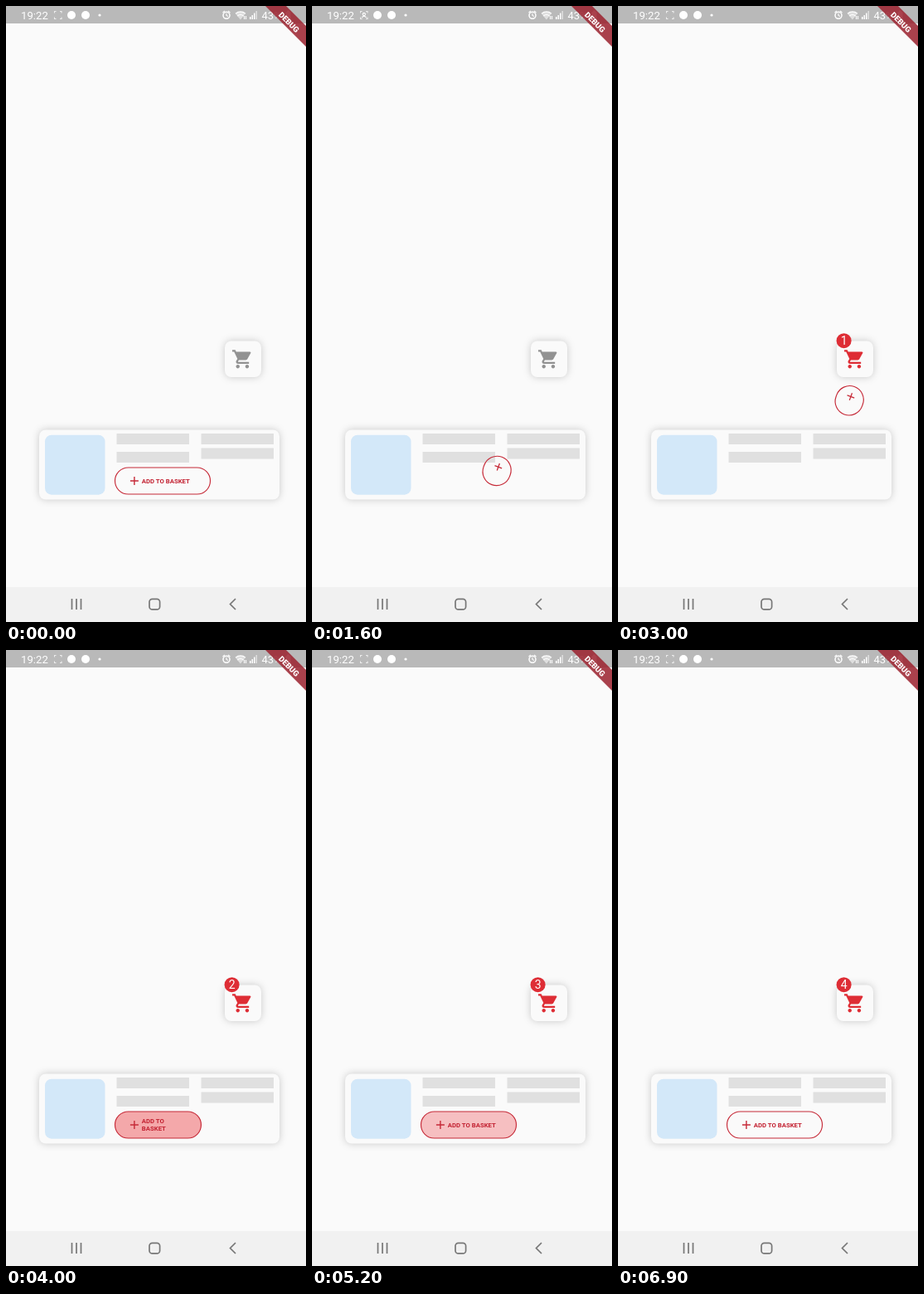
An HTML page for the animation above (7.1 s loop, 362 by 742 pixels).

```html
<!DOCTYPE html>
<html lang="en">
<head>
<meta charset="utf-8">
<title>Add to basket</title>
<style>
  html, body { margin: 0; width: 100%; height: 100%; overflow: hidden; background: #fafafa; }
  svg { display: block; width: 362px; height: 742px; font-family: Roboto, sans-serif; }
  .panel { fill: #fafafa; filter: drop-shadow(0 0 5px rgba(0, 0, 0, .2)); }
  .bars { fill: #e0e0e0; }
  .line { fill: none; stroke: #fff; stroke-width: 1.1; }
  .nav { fill: none; stroke: #777; stroke-width: 1.7; }
  .status { fill: #fff; font-size: 13.2px; }
  .label { fill: #c32232; font-size: 7.75px; font-weight: 700; }
  .red { fill: #de2d35; }
</style>
</head>
<body>
<svg viewBox="0 0 362 742">
  <rect width="362" height="742" fill="#fafafa"/>

  <!-- status bar -->
  <rect width="362" height="21" fill="#b9b9b9"/>
  <g class="status">
    <text id="clock" x="18" y="15.6">19:22</text>
    <circle cx="79" cy="11" r="5"/>
    <circle cx="96" cy="11" r="5"/>
    <circle cx="113" cy="11" r="1.6"/>
    <text x="308.5" y="15.6" font-size="13">43%</text>
    <rect x="337.5" y="7" width="6" height="10" rx="1"/>
    <rect x="339" y="5.6" width="3" height="2"/>
    <path d="M282.9 16.5l-6-7.3a9 9 0 0 1 12 0z" opacity=".55"/>
    <path d="M294 13h1.5v3H294zM296.5 11h1.5v5h-1.5zM299 8.500h1.500v7.500H299z"/>
    <path d="M301.500 6h1.500v10h-1.500z" opacity=".55"/>
  </g>
  <g class="line">
    <path d="M58.500 8.500v-2h2M65 6.500h2v2M67 13.500v2h-2M60.500 15.500h-2v-2" opacity=".75"/>
    <g id="dot"><circle cx="62.800" cy="10" r="1.600"/><path d="M60 14q2.800-3.500 5.600 0"/></g>
    <circle cx="266" cy="11.300" r="4" stroke-width="1.500"/>
    <path d="M266 9v2.500l2 1M261.500 8l2.500-2.200M270.500 8L268 5.800"/>
    <path d="M277 9.200a9 9 0 0 1 12 0M279.200 12a6 6 0 0 1 7.400 0M287.500 12v4M289.500 12v4"/>
  </g>

  <!-- product card -->
  <rect class="panel" x="40" y="510.500" width="290" height="84" rx="8"/>
  <rect x="47" y="516.700" width="72.500" height="72" rx="8" fill="#d3e8f9"/>
  <g class="bars">
    <rect x="133.500" y="515" width="87.500" height="13"/>
    <rect x="133.500" y="537" width="87.500" height="13"/>
    <rect x="235.500" y="515" width="87.500" height="13"/>
    <rect x="235.500" y="532.500" width="87.500" height="13"/>
  </g>
  <g id="done">
    <rect x="132" y="560" width="114" height="26" rx="7" fill="#f8b1ba"/>
    <text class="red" x="189" y="577.500" text-anchor="middle" font-size="13.500" font-weight="700">IN YOUR BASKET</text>
  </g>

  <!-- cart -->
  <g id="cart">
    <rect class="panel" x="264" y="403.500" width="44" height="43.500" rx="8"/>
    <path id="icon" transform="translate(271.900 411.900) scale(1.12)" d="M7 18c-1.100 0-1.990.9-1.990 2S5.900 22 7 22s2-.9 2-2-.9-2-2-2zM1 2v2h2l3.600 7.590-1.350 2.450c-.16.28-.25.61-.25.96 0 1.100.9 2 2 2h12v-2H7.420c-.14 0-.25-.11-.25-.25l.03-.12.9-1.630h7.450c.75 0 1.410-.41 1.750-1.030l3.580-6.490A1.003 1.003 0 0 0 20 4H5.210l-.94-2H1zm16 16c-1.100 0-1.990.9-1.990 2s.89 2 1.990 2 2-.9 2-2-.9-2-2-2z"/>
    <g id="badge">
      <circle class="red" cx="272.600" cy="403.200" r="9"/>
      <text id="count" x="272.600" y="408.200" text-anchor="middle" font-size="14" fill="#fff"></text>
    </g>
  </g>

  <!-- button; shrinks to a ring and flies -->
  <g id="button">
    <rect id="shape" fill="#ea3a40" stroke="#c62a38" stroke-width="1.150"/>
    <path id="plus" d="M-5 0H5M0-5V5" stroke="#c62a38" stroke-width="1.400"/>
  </g>
  <text class="label" id="wide" x="163.800" y="574.700">ADD TO BASKET</text>
  <g class="label" id="wrapped">
    <text x="163.800" y="570.300">ADD TO</text>
    <text x="163.800" y="579.300">BASKET</text>
  </g>

  <!-- debug ribbon -->
  <path d="M313 0h25L362 24v25z" fill="#9c2430" fill-opacity=".86"/>
  <text transform="translate(341.500 19.500) rotate(45)" y="3.400" text-anchor="middle" font-size="9.500" font-weight="800" fill="#fff">DEBUG</text>

  <!-- navigation bar -->
  <rect y="700" width="362" height="42" fill="#f1f1f1"/>
  <path class="nav" d="M79.500 714v13M85 714v13M90.500 714v13M277 714l-6.500 6.500 6.500 6.500"/>
  <rect class="nav" x="173" y="714.300" width="12.600" height="12.600" rx="3.500"/>
</svg>
<script>
const LOOP = 7100;
const LAND = 750;
// press time and the time the button comes back
const taps = [[1088, 2300], [2300, 3800], [3800, 5000], [5081, 6400]];

const $ = id => document.getElementById(id);
const show = (id, on) => { $(id).style.display = on ? '' : 'none'; };
const set = (id, attrs) => { for (const k in attrs) $(id).setAttribute(k, attrs[k]); };
const ramp = (v, a, b) => Math.min(1, Math.max(0, (v - a) / (b - a)));
const mix = (a, b, k) => a + (b - a) * k;
const bezier = (a, b, c, s) => (1 - s) ** 2 * a + 2 * s * (1 - s) * b + s * s * c;

function drawButton(u) {
  const w = mix(115, 33.5, ramp(u, 140, 390) ** 1.4);
  const s = ramp(u, 383, 768);
  const turn = ramp(s, 0, .25);
  const h = mix(32, 35.5, turn);
  const x = s ? bezier(148.3, 282, 284, s) : 131.5 + w / 2;
  const y = bezier(572, 582, 425, s);
  set('button', { transform: `translate(${x} ${y}) rotate(${20 * turn})` });
  set('shape', {
    x: -w / 2, y: -h / 2, width: w, height: h, rx: Math.min(w, h) / 2,
    'fill-opacity': .43 * ramp(u, 20, 160) * (1 - ramp(u, 260, 400))
  });
  const px = mix(23.4 - w / 2, 0, turn);
  set('plus', { transform: `translate(${px} ${-5 * turn}) scale(${mix(1, .92, turn)})` });
  show('wide', w > 112);
  show('wrapped', w <= 112 && w > 68);
}

function draw(t) {
  const tap = taps.findLast(([press]) => t >= press);
  const u = tap ? t - tap[0] : 0;
  const done = u >= LAND && t < tap[1];
  const idle = !tap || t >= tap[1] || taps.some(([press, back]) => t >= back && t < press);
  show('done', done);
  show('button', !done);
  drawButton(idle ? 0 : u);
  if (done) { show('wide', false); show('wrapped', false); }

  const hop = ramp(u, LAND, 790) - ramp(u, 820, 880);
  set('cart', { transform: `translate(0 ${-6 * hop})` });
  const n = taps.filter(([press]) => t >= press + 830).length;
  $('count').textContent = n;
  show('badge', n > 0);
  set('icon', { fill: n ? '#de2d35' : '#929292' });

  $('clock').textContent = t < 6700 ? '19:22' : '19:23';
  show('dot', t >= 75 && (t - 75) % 1050 < 525);
}

let start;
function tick(now) {
  start ??= now;
  draw((now - start) % LOOP);
  requestAnimationFrame(tick);
}
draw(0);
requestAnimationFrame(tick);
</script>
</body>
</html>
```
